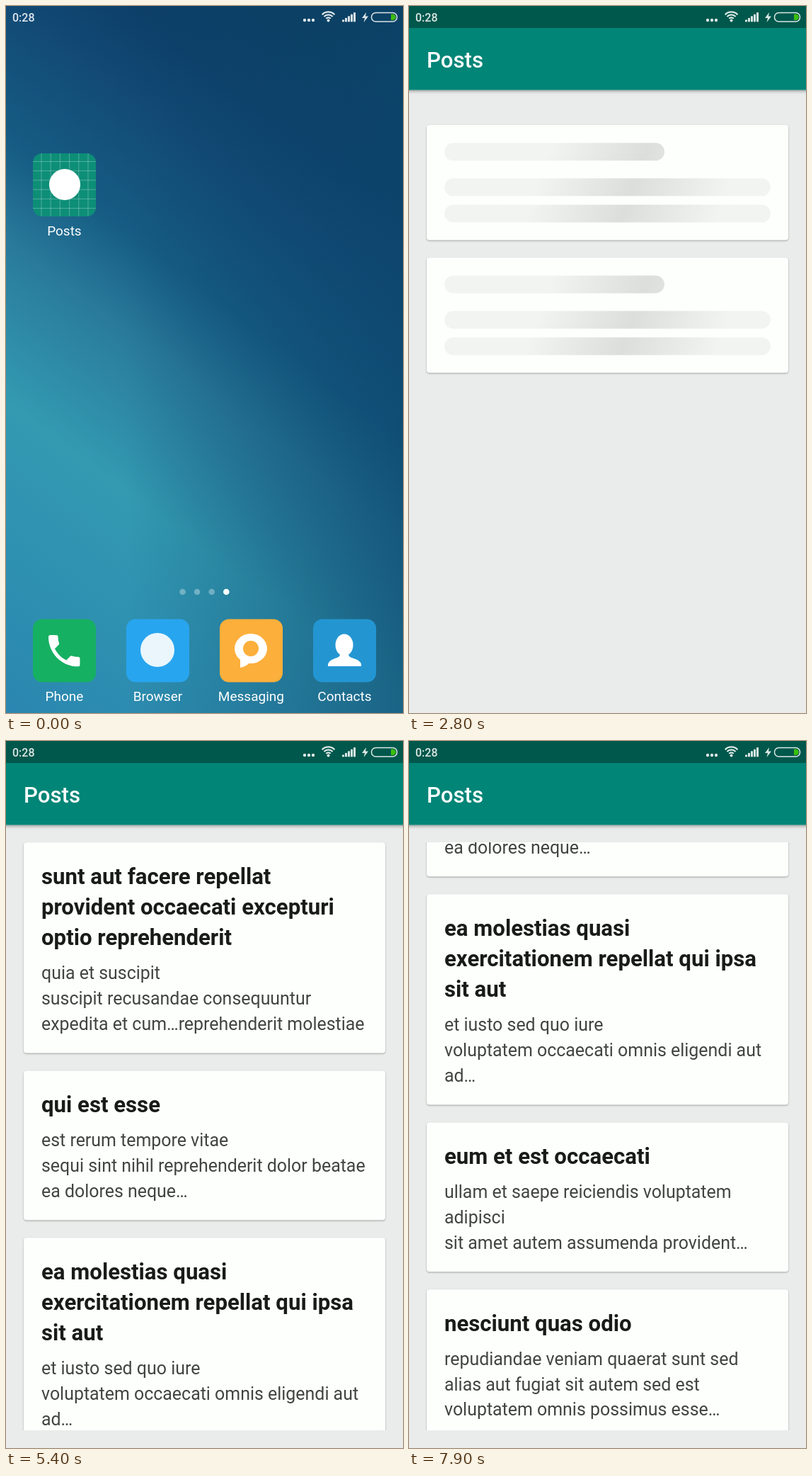
Write an HTML page that moves like this. It is 561 by 998 pixels and loops after 8 s.

```html
<!DOCTYPE html>
<html lang="en">
<head>
<meta charset="utf-8">
<title>Posts</title>
<style>
  html, body { margin: 0; width: 100%; height: 100%; overflow: hidden; background: #eaeceb; }
  svg { display: block; width: 561px; height: 998px; font-family: Roboto, sans-serif; }
  text { white-space: pre; }
  .label { font-size: 19px; fill: #fff; text-anchor: middle; }
  .heading { font-size: 31.17px; font-weight: 700; fill: #191b19; }
  .body { font-size: 24.93px; fill: #424442; }
  .card { fill: #fdfffd; filter: drop-shadow(0 1.5px 1.2px rgba(0, 0, 0, .32)); }
</style>
</head>
<body>
<svg viewBox="0 0 561 998" xmlns="http://www.w3.org/2000/svg">
  <defs>
    <linearGradient id="sky" gradientUnits="userSpaceOnUse" x1="561" y1="0" x2="-120" y2="908">
      <stop offset="0" stop-color="#0b3a56"/>
      <stop offset=".21" stop-color="#0d406a"/>
      <stop offset=".3" stop-color="#124b76"/>
      <stop offset=".43" stop-color="#165c83"/>
      <stop offset=".53" stop-color="#297a9b"/>
      <stop offset=".69" stop-color="#339ab2"/>
      <stop offset="1" stop-color="#2a86b0"/>
    </linearGradient>
    <linearGradient id="dusk">
      <stop offset=".3" stop-color="#0c466e" stop-opacity="0"/>
      <stop offset="1" stop-color="#0c466e" stop-opacity=".65"/>
    </linearGradient>
    <linearGradient id="drop" x2="0" y2="1">
      <stop offset="0" stop-opacity=".34"/>
      <stop offset=".4" stop-opacity=".12"/>
      <stop offset="1" stop-opacity="0"/>
    </linearGradient>
    <linearGradient id="shimmer" gradientUnits="userSpaceOnUse" x1="-128" x2="128" y1="0" y2="0">
      <stop offset="0" stop-color="#f2f4f2"/>
      <stop offset=".5" stop-color="#dcdedc"/>
      <stop offset="1" stop-color="#f2f4f2"/>
    </linearGradient>
    <clipPath id="reveal"><rect id="window"/></clipPath>
    <clipPath id="viewport"><rect y="143" width="561" height="830"/></clipPath>
  </defs>

  <g id="home">
    <rect width="561" height="998" fill="url(#sky)"/>
    <rect width="561" height="998" fill="url(#dusk)"/>
    <g id="tiles"></g>
    <path id="grid" stroke="#fff" stroke-opacity=".28" fill="none"/>
    <circle cx="83" cy="252" r="22" fill="#fff"/>
    <rect id="press" x="38" y="208" width="89" height="89" rx="13" fill-opacity=".4"/>
    <g id="pager"></g>
    <path transform="translate(52.6 880.5) scale(2.47)" fill="#fff" d="M6.62 10.79c1.44 2.83 3.76 5.14 6.59 6.59l2.2-2.2c.27-.27.67-.36 1.02-.24 1.12.37 2.33.57 3.57.57.55 0 1 .45 1 1V20c0 .55-.45 1-1 1-9.39 0-17-7.61-17-17 0-.55.45-1 1-1h3.5c.55 0 1 .45 1 1 0 1.25.2 2.45.57 3.57.11.35.03.74-.25 1.02z"/>
    <circle cx="214" cy="909" r="24" fill="#eaf6fc"/>
    <g fill="#fff">
      <ellipse cx="346" cy="907" rx="23" ry="21"/>
      <path d="M331 918V934Q341 932 346 925Z"/>
      <circle cx="346" cy="907" r="11" fill="#fcaf3b"/>
      <ellipse cx="478" cy="902" rx="12.5" ry="15.5"/>
      <path d="M472 910h12v6q1 3 6 4.500q11 3 12 9v2.500h-47v-2.500q1-6 11-9q5-1.500 6-4.500z"/>
    </g>
  </g>

  <g id="app" clip-path="url(#reveal)">
    <rect width="561" height="998" fill="#eaeceb"/>
    <g id="content">
      <rect y="118.500" width="561" height="6" fill="url(#drop)"/>
      <g id="bars">
        <rect y="-60" width="561" height="91" fill="#00574b"/>
        <rect y="31" width="561" height="87.500" fill="#008577"/>
      </g>
      <text x="25" y="87" font-size="31.170" font-weight="500" fill="#fff">Posts</text>
      <g id="skeleton"></g>
      <g id="list" clip-path="url(#viewport)"><g id="posts"></g></g>
    </g>
  </g>

  <g id="status" fill="#fff" opacity=".86">
    <text x="9" y="21.500" font-size="16" font-weight="500">0:28</text>
    <path d="M503 17L509 9L508 14.500H512L505.500 23L507 17Z"/>
    <rect x="516.500" y="9.500" width="36" height="12.500" rx="6" fill="none" stroke="#fff" stroke-width="1.500"/>
    <path d="M544 11.500h2.500a4.300 4.300 0 0 1 0 8.600h-2.500z" fill="#44d000"/>
  </g>
</svg>

<script>
const $ = id => document.getElementById(id);
const range = n => [...Array(n).keys()];
const clamp = v => Math.min(1, Math.max(0, v));
const mix = (a, b, p) => a + (b - a) * p;
const smooth = p => p * p * (3 - 2 * p);
const show = (id, on) => $(id).style.display = on ? '' : 'none';

const LOOP = 8000, FRAME = 100;
const PRESS = 2100, LAUNCH = 2155, LAUNCH_TIME = 336, LOADED = 5300;
const SHIMMER_START = 2267, SHIMMER_TIME = 1000;
const SCROLL_START = 7300, SCROLL_TIME = 600, SCROLL_BY = 485;

// Home screen
const tile = (x, y, color, name) => `
  <rect x="${x}" y="${y}" width="89" height="89" rx="13" fill="${color}"/>
  <text class="label" x="${x + 44.4}" y="${y + 115.5}">${name}</text>`;
$('tiles').innerHTML = tile(38, 208, '#0d8e77', 'Posts') + [
  ['#16b062', 'Phone'], ['#28a5ef', 'Browser'], ['#fcaf3b', 'Messaging'], ['#2396d2', 'Contacts']
].map(([color, name], i) => tile(38 + 132 * i, 865.5, color, name)).join('');
$('grid').setAttribute('d', range(6).map(i =>
  `M${50 + 13.2 * i} 208v89M38 ${219.5 + 13.2 * i}h89`).join(''));
$('pager').innerHTML = range(4).map(i =>
  `<circle cx="${249.5 + 20.6 * i}" cy="827" r="4.300" fill="#fff" opacity="${i < 3 ? .33 : 1}"/>`).join('');

// Status icons
$('status').innerHTML += range(3).map(i => {
  const r = 4.5 + 3.9 * i, d = r * .72;
  return `<circle cx="${422 + 6 * i}" cy="20" r="2.200"/>
    <path d="M${455.5 - d} ${21 - d}A${r} ${r} 0 0 1 ${455.5 + d} ${21 - d}" fill="none" stroke="#fff" stroke-width="2.200"/>`;
}).join('') + '<circle cx="455.5" cy="20.500" r="2"/>' + range(5).map(i =>
  `<rect x="${475 + 4 * i}" y="${19.5 - 2.6 * i}" width="3" height="${2.8 + 2.6 * i}"/>`).join('');

// Loading placeholders
const bar = (y, w) => `<rect x="25" y="${y}" width="${w}" height="25" rx="12.500" fill="url(#shimmer)"/>`;
$('skeleton').innerHTML = [168, 355.2].map(y => `<g transform="translate(25 ${y})">
  <rect class="card" width="511" height="162.500" rx="4"/>
  ${bar(25.3, 311)}${bar(75.3, 461)}${bar(112.6, 461)}</g>`).join('');

// Post list: heading lines, then body lines
const posts = [
  [['sunt aut facere repellat', 'provident occaecati excepturi', 'optio reprehenderit'],
   ['quia et suscipit', 'suscipit recusandae consequuntur', 'expedita et cum…reprehenderit molestiae']],
  [['qui est esse'],
   ['est rerum tempore vitae', 'sequi sint nihil reprehenderit dolor beatae', 'ea dolores neque…']],
  [['ea molestias quasi', 'exercitationem repellat qui ipsa', 'sit aut'],
   ['et iusto sed quo iure', 'voluptatem occaecati omnis eligendi aut', 'ad…']],
  [['eum et est occaecati'],
   ['ullam et saepe reiciendis voluptatem', 'adipisci', 'sit amet autem assumenda provident…']],
  [['nesciunt quas odio'],
   ['repudiandae veniam quaerat sunt sed', 'alias aut fugiat sit autem sed est', 'voluptatem omnis possimus esse…']]
];
const HEAD_LINE = 43.3, BODY_LINE = 35.8;
const lines = (list, type, y, step) => list.map((s, i) =>
  `<text class="${type}" x="50" y="${y + step * i}">${s}</text>`).join('');
let top_ = 143.2;
$('posts').innerHTML = posts.map(([head, body]) => {
  const y = top_, h = HEAD_LINE * head.length + BODY_LINE * body.length + 60;
  top_ += h + 25;
  return `<rect class="card" x="25" y="${y}" width="511" height="${h}" rx="4"/>`
    + lines(head, 'heading', y + 58.6, HEAD_LINE)
    + lines(body, 'body', y + 63.3 + HEAD_LINE * head.length, BODY_LINE);
}).join('');

// Fast-out-slow-in: cubic-bezier(.4, 0, .2, 1)
function fastOut(x) {
  let lo = 0, hi = 1;
  for (let i = 0; i < 20; i++) {
    const u = (lo + hi) / 2, v = 1 - u;
    if (1.2 * u * v * v + .6 * u * u * v + u ** 3 < x) lo = u; else hi = u;
  }
  return smooth(lo);
}

function setWindow(p) {
  const side = clamp(p * 1.6);
  const left = mix(38, 0, side), right = mix(127, 561, side);
  const top = mix(208, 0, p), bottom = mix(297, 998, p);
  const box = { x: left, y: top, width: right - left, height: bottom - top };
  for (const key in box) $('window').setAttribute(key, box[key]);
  $('content').setAttribute('transform', `translate(0 ${50 * (1 - p)})`);
  $('bars').setAttribute('opacity', p < 1 ? .94 : 1);
}

function draw(t) {
  const launch = clamp((t - LAUNCH) / LAUNCH_TIME);
  show('press', t >= PRESS);
  show('app', launch > 0);
  $('app').setAttribute('opacity', clamp(launch * 4));
  setWindow(launch < 1 ? fastOut(launch) : 1);

  show('skeleton', t < LOADED);
  show('list', t >= LOADED);
  const sweep = Math.max(0, t - SHIMMER_START) % SHIMMER_TIME / SHIMMER_TIME;
  $('shimmer').setAttribute('gradientTransform',
    `translate(${255.5 + mix(-570, 570, sweep)} 81) rotate(20)`);

  const scroll = SCROLL_BY * smooth(clamp((t - SCROLL_START) / SCROLL_TIME));
  $('posts').setAttribute('transform', `translate(0 ${-scroll})`);
}

const start = performance.now();
function tick() {
  const t = (performance.now() - start) % LOOP;
  draw(Math.floor(t / FRAME) * FRAME);
  requestAnimationFrame(tick);
}
tick();
</script>
</body>
</html>
```
